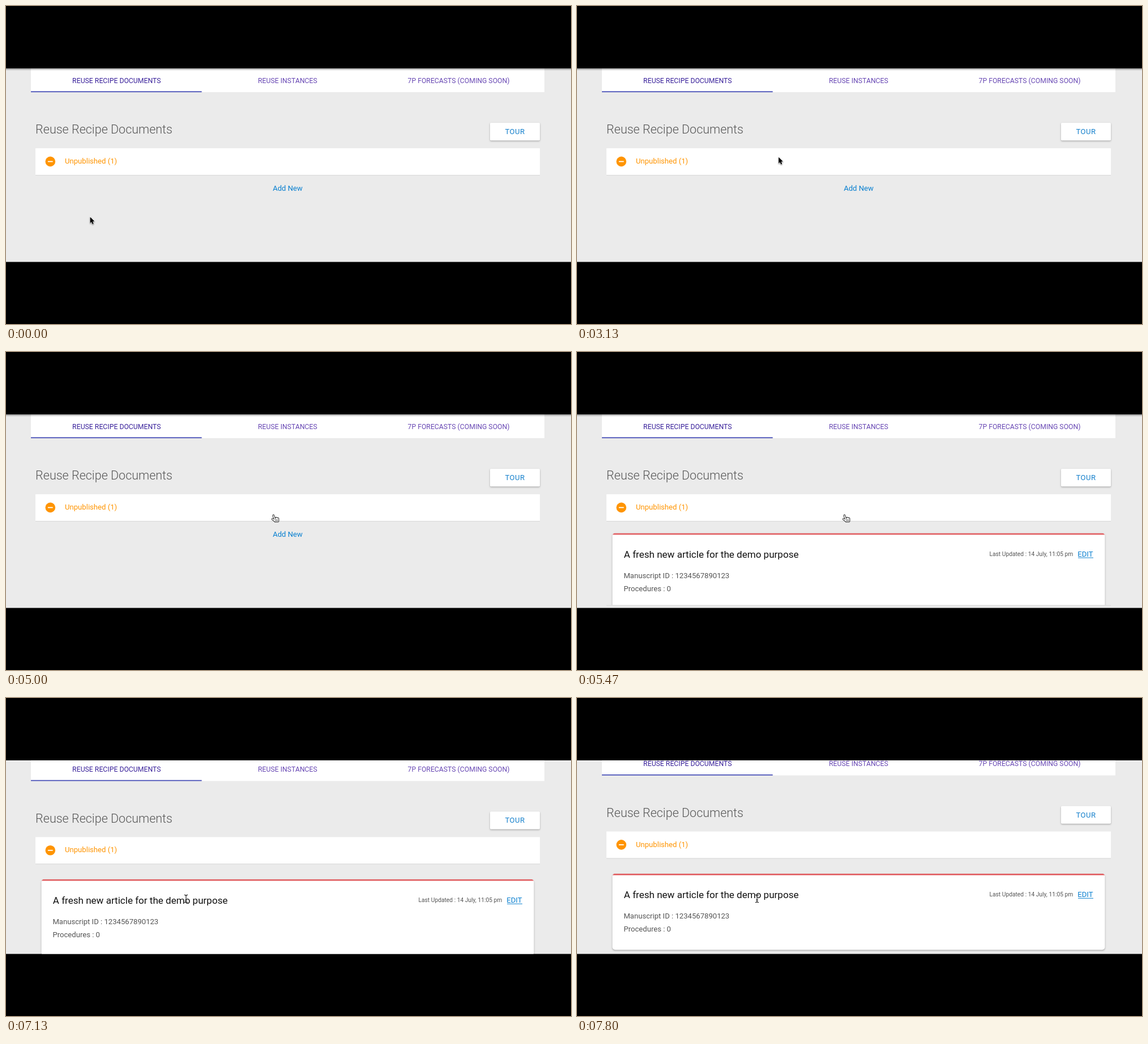
Write an HTML page with a canvas that moves like this. It is 998 px wide and 561 px high and loops after 8 s.

```html
<!DOCTYPE html>
<html lang="en">
<head>
<meta charset="utf-8">
<title>Reuse Recipe Documents</title>
<style>
html, body { margin: 0; width: 100%; height: 100%; overflow: hidden; background: #000; }
canvas { display: block; width: 998px; height: 561px; }
</style>
</head>
<body>
<canvas id="stage" width="998" height="561"></canvas>
<script>
const ctx = document.getElementById('stage').getContext('2d');
const LOOP = 8000, STEP = 200 / 3, OPEN_AT = 5354;
const REM = 13.125, BODY = 188.5, CARD = 134.5;
const BLUE = '#0a80d0', ORANGE = '#ff9400', PURPLE = '#6848b4', INK = '#545454', RULE = '#d8d8d8';

// Pointer moves: start, end, then the points to pass; each begins where the last one stopped
const home = [148, 371];
const moves = [
  [533, 1400, [440, 313], [478, 318]],
  [1400, 1733, [492, 328], [503, 317]],
  [1800, 2400, [358, 254], [355.5, 265.5]],
  [3133, 3933, [363, 269], [176, 275], [221, 275]],
  [3933, 4800, [478, 320], [473, 294]],
  [4800, 5000, [473, 286]],
  [5600, 6200, [400, 330], [318, 354]]
];

const ramp = (t, from, to) => Math.max(0, Math.min(1, (t - from) / (to - from)));
const easeOut = (u, power) => 1 - (1 - u) ** power;
const smooth = u => u * u * (3 - 2 * u);
const mix = (a, b, u) => a + (b - a) * u;

// Catmull-Rom curve through the points
function along(pts, u) {
  const n = pts.length - 1, i = Math.min(n - 1, Math.floor(u * n)), f = u * n - i;
  const at = k => pts[Math.max(0, Math.min(n, k))];
  const [a, b, c, d] = [at(i - 1), at(i), at(i + 1), at(i + 2)];
  return [0, 1].map(k => b[k] + 0.5 * f * (c[k] - a[k]
    + f * (2 * a[k] - 5 * b[k] + 4 * c[k] - d[k]
    + f * (3 * (b[k] - c[k]) + d[k] - a[k]))));
}

function pointerAt(t) {
  let place = home;
  for (const [from, to, ...pts] of moves) {
    if (t < from) break;
    place = along([place, ...pts], smooth(ramp(t, from, to)));
  }
  return place;
}

function pointerFor([x, y], open) {
  if (open && x < 392 && y > 338) return beam;
  return x > 470 && y > 283 && y < 330 ? hand : arrow;
}

function scrollAt(t) {
  return 3 * ramp(t, 6466, 6667) + 12.5 * easeOut(ramp(t, 7000, 7800), 1.3);
}

function rect(x, y, w, h, color) {
  ctx.fillStyle = color;
  ctx.fillRect(x, y, w, h);
}

function text(str, x, y, size, color, { weight = 400, align = 'left', spacing = 0 } = {}) {
  ctx.font = `${weight} ${size}px Roboto, sans-serif`;
  ctx.letterSpacing = spacing + 'px';
  ctx.textAlign = align;
  ctx.fillStyle = color;
  ctx.fillText(str, x, y);
}

function shadow(alpha, blur, y) {
  ctx.shadowColor = `rgba(0,0,0,${alpha})`;
  ctx.shadowBlur = blur;
  ctx.shadowOffsetY = y;
}

function raised(x, y, w, h, r) {
  ctx.save();
  shadow(0.3, 3, 1.3);
  ctx.fillStyle = '#fff';
  ctx.beginPath();
  ctx.roundRect(x, y, w, h, r);
  ctx.fill();
  ctx.restore();
}

function lines(segments, color, width) {
  ctx.beginPath();
  for (const [x0, y0, x1, y1] of segments) {
    ctx.moveTo(x0, y0);
    ctx.lineTo(x1, y1);
  }
  ctx.strokeStyle = color;
  ctx.lineWidth = width;
  ctx.stroke();
}

function arrow() {
  const outline = [[0.7, 1.2], [0.7, 12], [3.1, 9.8], [4.8, 13.7], [6.7, 12.9], [5, 9.1], [8.2, 8.8]];
  shadow(0.35, 2, 1);
  ctx.beginPath();
  outline.forEach(p => ctx.lineTo(...p));
  ctx.closePath();
  ctx.lineJoin = 'round';
  ctx.lineWidth = 1.6;
  ctx.strokeStyle = '#fff';
  ctx.stroke();
  ctx.fillStyle = '#000';
  ctx.fill();
}

function hand() {
  const fingers = [0, 1, 2].map(i => [4 + i * 1.8, 6.8 + i * 0.5, 4.4 + i * 1.6, 12.6]);
  const shape = [[-0.7, 2.4, 1.8, 9.4], [-2.2, 8.8, 2.6, 12.6], [2, 9, 2.6, 12.6], ...fingers];
  ctx.lineCap = 'round';
  lines(shape, '#161616', 3.6);
  lines(shape, '#fff', 1.8);
  lines(fingers.map(([x]) => [x - 0.8, 9.6, x - 0.8, 12.2]), '#333', 0.7);
}

function beam() {
  ctx.beginPath();
  for (const side of [-1, 1]) for (const end of [-1, 1]) {
    ctx.moveTo(side * 3, end * 6.6);
    ctx.quadraticCurveTo(side * 0.4, end * 6.6, 0, end * 5);
    ctx.lineTo(0, 0);
  }
  ctx.moveTo(-1.8, 2.2);
  ctx.lineTo(1.8, 2.2);
  for (const [color, width] of [['rgba(255,255,255,.6)', 2.4], ['#111', 1.1]]) {
    ctx.strokeStyle = color;
    ctx.lineWidth = width;
    ctx.stroke();
  }
}

function header() {
  const labels = ['REUSE RECIPE DOCUMENTS', 'REUSE INSTANCES', '7P FORECASTS (COMING SOON)'];
  rect(44, 100, 907, 52, '#fff');
  rect(44, 150.4, 301.7, 1.7, '#4048b4');
  labels.forEach((label, i) =>
    text(label, 195.3 + i * 302.1, 135.9, 12.25, i ? PURPLE : '#38209a', { align: 'center' }));
  const shade = ctx.createLinearGradient(0, 109, 0, 114);
  shade.addColorStop(0, 'rgba(0,0,0,.46)');
  shade.addColorStop(0.5, 'rgba(0,0,0,.24)');
  shade.addColorStop(1, 'rgba(0,0,0,0)');
  rect(0, 109, 998, 5, shade);
}

function listRow() {
  text('Reuse Recipe Documents', 52.1, 225.2, 1.64 * REM, '#585858', { weight: 300 });
  raised(855, 206, 88, 31.2, 1.8);
  text('TOUR', 899, 226.1, REM, '#1580cc', { align: 'center', spacing: 0.4 });
  rect(52, 251, 891, 47, '#fff');
  rect(52, 298, 891, 1, RULE);
  ctx.fillStyle = ORANGE;
  ctx.beginPath();
  ctx.arc(78.3, 274.4, 8.8, 0, 7);
  ctx.fill();
  rect(73.9, 273.5, 8.8, 1.8, '#fff');
  text('Unpublished (1)', 104, 278, REM, ORANGE);
}

function card(open) {
  const y = 298 + 27.3 * open, bottom = 298 + BODY * open;
  ctx.save();
  ctx.beginPath();
  ctx.rect(52, 299, 891, bottom - 299);
  ctx.clip();
  raised(62.5, y, 870, CARD, 5);
  ctx.beginPath();
  ctx.roundRect(62.5, y, 870, CARD, 5);
  ctx.clip();
  rect(62, y, 871, 2.8, '#e05c5f');
  text('A fresh new article for the demo purpose', 82.8, y + 43, 1.3 * REM, '#111');
  text('Last Updated : 14 July, 11:05 pm', 876.2, y + 40.4, 10.25, INK, { align: 'right' });
  text('EDIT', 884.3, y + 41.4, REM, BLUE);
  rect(885, y + 43, 27, 1, BLUE);
  text('Manuscript ID : 1234567890123', 82.4, y + 79.6, REM, INK);
  text('Procedures : 0', 82.4, y + 102.2, REM, INK);
  ctx.restore();
  rect(52, bottom, 891, 1, RULE);
}

function draw(t) {
  const open = easeOut(ramp(t, OPEN_AT, OPEN_AT + 350), 4);
  rect(0, 0, 998, 561, '#000');
  ctx.save();
  ctx.beginPath();
  ctx.rect(0, 110, 998, 341.5);
  ctx.clip();
  rect(0, 110, 998, 342, '#ebebeb');

  ctx.save();
  ctx.translate(0, -scrollAt(t));
  header();
  listRow();
  if (open) card(open);
  text('Add New', 497.5, 325.9 + BODY * open, REM, BLUE, { align: 'center' });
  ctx.restore();

  const place = pointerAt(t);
  ctx.translate(...place);
  pointerFor(place, open)();
  ctx.restore();
}

function tick(now) {
  draw(Math.floor((now % LOOP + 4) / STEP) * STEP);
  requestAnimationFrame(tick);
}
draw(0);
requestAnimationFrame(tick);
</script>
</body>
</html>
```
